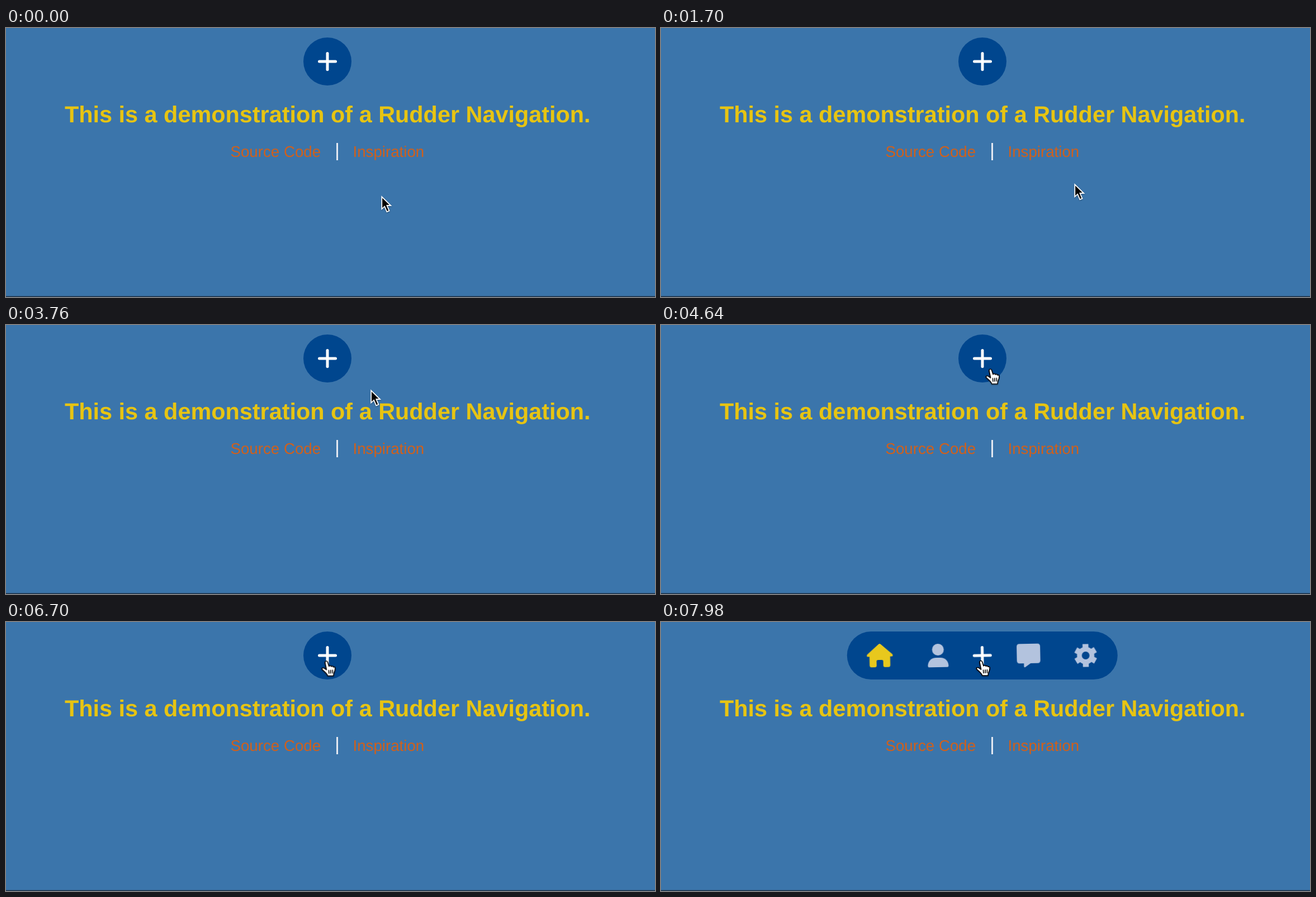
Write an HTML page that moves like this. It is 1161 px wide and 482 px high and loops after 8 s.

```html
<!DOCTYPE html>
<html lang="en">
<head>
<meta charset="utf-8">
<title>Rudder Navigation</title>
<style>
  :root { --loop: 8000ms linear infinite; }
  html, body { margin: 0; width: 100%; height: 100%; overflow: hidden; background: #3b75ab; }
  svg { display: block; overflow: visible; }
  .page, .cursor { position: absolute; left: 0; top: 0; }
  .page { font-family: "Liberation Sans", Arial, sans-serif; text-rendering: geometricPrecision; }
  .title { font-size: 41.4px; font-weight: bold; fill: #e7c412; }
  .link { font-size: 27.7px; fill: #d1601b; }

  .nav {
    position: absolute; left: 575px; top: 17px;
    width: 86px; height: 86px; border-radius: 43px;
    translate: -50% 0; overflow: hidden; background: #00468e;
    animation: widen var(--loop);
  }
  .nav svg { position: absolute; left: calc(50% - 24px); top: 19px; width: 48px; height: 48px; }
  .item {
    fill: #b4c3de; stroke: none;
    animation: slide var(--loop), spin var(--loop);
  }
  .home { fill: #e9c81c; }
  .plus { stroke: #fff; stroke-width: 5; stroke-linecap: round; animation: spin var(--loop); }

  .cursor { animation: move var(--loop); }
  .arrow { animation: arrow 8000ms step-end infinite; }
  .hand { animation: hand 8000ms step-end infinite; }
  .cursor svg { position: absolute; left: 0; top: 0; filter: drop-shadow(0 1.5px 1px #0005); }

  /* The bar only grows once it is wider than its resting circle. */
  @keyframes widen { 0%, 87.57% { width: 86px } 99.81%, 100% { width: 486px } }
  @keyframes slide {
    0%, 87.57% { translate: var(--from) 0; opacity: 0 }
    99.81%, 100% { translate: var(--to) 0; opacity: 1 }
  }
  @keyframes spin { 0%, 84.94% { rotate: 0deg } 99.81%, 100% { rotate: 360deg } }
  @keyframes move {
    0% { translate: 671px 300px }
    10% { translate: 712px 287px }
    19.5% { translate: 734px 285px }
    21.25% { translate: 739px 278px }
    30% { translate: 772px 276px }
    33% { translate: 773px 233px }
    40.5% { translate: 732px 166px }
    47% { translate: 652px 115px }
    53.5% { translate: 599px 85px }
    61% { translate: 579px 76px }
    69.75% { translate: 575px 74px }
    86%, 100% { translate: 570px 70px }
  }
  @keyframes arrow { 0% { opacity: 1 } 52.3%, 100% { opacity: 0 } }
  @keyframes hand { 0% { opacity: 0 } 52.3%, 100% { opacity: 1 } }
</style>
</head>
<body>
  <svg class="page" width="1161" height="482">
    <text class="title" x="105" y="168.5">This is a demonstration of a Rudder Navigation.</text>
    <text class="link" x="401.5" y="230.5">Source Code</text>
    <text class="link" x="620.5" y="230.5">Inspiration</text>
    <path d="M591 206h3v31h-3z" fill="#e3e8f1"/>
    <path d="M0 480.5h1161v1.5H0z" fill="#1c2f42"/>
  </svg>

  <div class="nav">
    <svg class="item home" style="--from:-26px;--to:-184px" viewBox="-24 -24 48 48">
      <path d="M-1.8-20.3Q0-21.6 1.8-20.3L22.5-2Q24.5 2 21 2H18.5V17.5Q18.5 21 15 21H9Q6 21 6 18V10.5Q6 8 3.5 8H-3.5Q-6 8-6 10.5V18Q-6 21-9 21H-15Q-18.5 21-18.5 17.5V2H-21Q-24.5 2-22.5-2Z"/>
    </svg>
    <svg class="item" style="--from:-2px;--to:-79.5px" viewBox="-24 -24 48 48">
      <circle cy="-10.5" r="10.5"/>
      <path d="M-18.5 18.5C-18.5 10-12 4-4 4H4C12 4 18.5 10 18.5 18.5Q18.5 21 16 21H-16Q-18.5 21-18.5 18.5Z"/>
    </svg>
    <svg class="item" style="--from:4px;--to:83px" viewBox="-24 -24 48 48">
      <path d="M-16-21H16Q21-21 21-16V9Q21 14 16 14H3.5L-6.5 21Q-8.5 21.5-8.5 19.5V14H-16Q-21 14-21 9V-16Q-21-21-16-21Z"/>
    </svg>
    <svg class="item" style="--from:30px;--to:185.5px" viewBox="-24 -24 48 48">
      <g fill="none" stroke="#b4c3de">
        <circle r="11.2" stroke-width="8.6"/>
        <path stroke-width="10.5" d="M0-13.5V-20.5M0 13.5V20.5M11.7-6.7 17.5-10.1M11.7 6.7 17.5 10.1M-11.7-6.7-17.5-10.1M-11.7 6.7-17.5 10.1"/>
      </g>
    </svg>
    <svg class="plus" viewBox="-24 -24 48 48"><path d="M-14.5 0H14.5M0-14.5V14.5"/></svg>
  </div>

  <div class="cursor">
    <svg class="arrow" width="22" height="34">
      <path d="M1.2 2.3V24.3L6.2 19.7 10.3 29.4 14.5 27.6 10.4 18H17.2Z" stroke="#fff" stroke-width="1.8"/>
    </svg>
    <svg class="hand" width="28" height="32">
      <g transform="translate(-7 -1.5)" stroke="#000" stroke-width="1.6" stroke-linecap="round" stroke-linejoin="round">
        <path fill="#fff" d="M7 4C6.5 .5 10.7 0 11.7 3L14 10.2C15.5 8.7 17.8 9 18.3 10.7 19.8 9.6 21.7 10.1 22.1 11.8 24 11 25.3 12.2 25.1 14.2 25 18.5 23.3 20.5 22.6 23.3L22 27.5H11.8C10.5 23.5 6.3 20 2.3 16.7 0 14.3 2.6 12 5.3 13.5L9.6 16.5Z"/>
        <path fill="none" d="M13.5 17.5 14 23M17 17.2V22.8M20.4 17V22.5"/>
      </g>
    </svg>
  </div>
</body>
</html>
```
